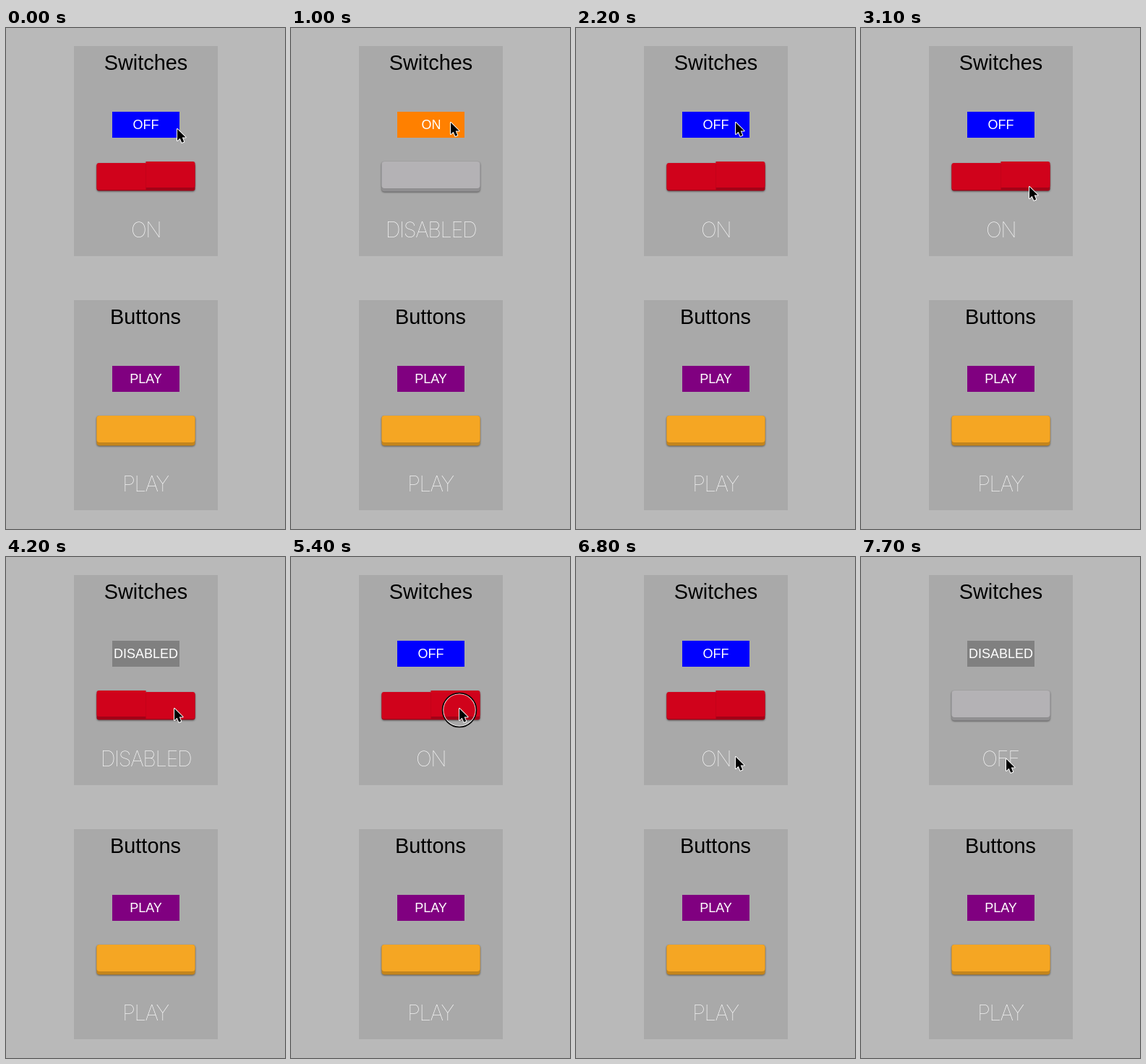
Write an HTML page that moves like this. It is 386 by 694 pixels and loops after 8 s.

```html
<!DOCTYPE html>
<html lang="en">
<head>
<meta charset="utf-8">
<title>Switches and buttons</title>
<style>
  html, body { margin: 0; height: 100%; overflow: hidden; background: #b9b9b9; }
  svg { display: block; width: 100vw; height: 100vh; }
  text { text-anchor: middle; font-family: "Liberation Sans", Arial, sans-serif; }
  .title { font-size: 28.9px; }
  .label { font-size: 18px; fill: #fff; }
  .thin { font: 100 29px Inter, Lato, sans-serif; letter-spacing: -1.4px; fill: #fff; }
  .panel { fill: #a9a9a9; }
  .raised { filter: drop-shadow(0 1px 1px rgba(0, 0, 0, .5)); }

  .idle, .first, .second, .third, #ring, #pointer { animation: 8s step-end infinite; }
  .idle { animation-name: idle; }
  .first { animation-name: first; }
  .second { animation-name: second; }
  .third { animation-name: third; }
  #ring { animation-name: press; }
  #pointer { animation-name: move; }

  /* 1.25% is 100 ms */
  @keyframes idle {
    0%, 26.25%, 58.75%, 78.75% { visibility: visible; }
    12.5%, 46.25%, 68.75%, 92.5%, 100% { visibility: hidden; }
  }
  @keyframes first {
    0%, 26.25%, 100% { visibility: hidden; }
    12.5% { visibility: visible; }
  }
  @keyframes second {
    0%, 58.75%, 78.75%, 100% { visibility: hidden; }
    46.25%, 68.75% { visibility: visible; }
  }
  @keyframes third {
    0% { visibility: hidden; }
    92.5%, 100% { visibility: visible; }
  }
  @keyframes press {
    0%, 12.5%, 26.25%, 46.25%, 58.75%, 68.75%, 78.75%, 92.5%, 100% { visibility: hidden; }
    10%, 25%, 45%, 57.5%, 67.5%, 77.5%, 91.25% { visibility: visible; }
  }
  @keyframes move {
    0% { transform: translate(237px, 140px); }
    1.25% { transform: translate(232px, 137px); }
    2.5% { transform: translate(226px, 133px); }
    3.75% { transform: translate(221px, 131px); }
    35% { transform: translate(227px, 185px); }
    36.25% { transform: translate(231px, 227px); }
    38.75% { transform: translate(233px, 220px); }
    40% { transform: translate(234px, 216px); }
    41.25% { transform: translate(233px, 212px); }
    42.5% { transform: translate(233px, 210px); }
    80% { transform: translate(232px, 222px); }
    81.25% { transform: translate(229px, 240px); }
    82.5% { transform: translate(226px, 258px); }
    83.75% { transform: translate(223px, 270px); }
    85% { transform: translate(221px, 277px); }
    86.25% { transform: translate(216px, 278px); }
    87.5% { transform: translate(212px, 279px); }
    88.75%, 100% { transform: translate(201px, 280px); }
  }
</style>
</head>
<body>
<svg viewBox="0 0 386 694">
  <defs>
    <rect id="flat" x="147" y="116" width="93" height="36"/>
    <g id="key" class="raised">
      <rect x="125.5" y="185" width="136" height="41.5" rx="4"/>
      <rect x="125.5" y="185" width="136" height="41.5" rx="4" fill="#000" opacity=".2"/>
      <rect x="125.5" y="185" width="136" height="37" rx="4"/>
    </g>
    <g id="rocker" class="raised" fill="#d0021b">
      <rect x="125.5" y="188" width="136" height="37.5" rx="3" fill="#a30217"/>
      <path d="M193.5 187H128.5a3 3 0 0 0-3 3V221a3 3 0 0 0 3 3H193.5z"/>
      <path d="M193.5 185H258.5a3 3 0 0 1 3 3V218a3 3 0 0 1-3 3H193.5z"/>
    </g>
    <g id="flatOff">
      <use href="#flat" fill="#808080"/>
      <text class="label" x="193.5" y="140.3">DISABLED</text>
    </g>
    <use id="keyOff" href="#key" fill="#b4b2b5"/>
    <text id="thinOff" class="thin" x="193.5" y="290">DISABLED</text>
  </defs>

  <rect width="386" height="694" fill="#b9b9b9"/>

  <rect class="panel" x="94" y="25" width="199" height="291"/>
  <text class="title" x="193.5" y="58">Switches</text>

  <g class="idle">
    <use href="#flat" fill="#00f"/>
    <text class="label" x="193.5" y="140.3">OFF</text>
    <use href="#rocker"/>
    <text class="thin" x="193.5" y="290">ON</text>
  </g>
  <g class="first">
    <use href="#flat" fill="#ff8000"/>
    <text class="label" x="194" y="140.3">ON</text>
    <use href="#keyOff"/>
    <use href="#thinOff"/>
  </g>
  <g class="second">
    <use href="#flatOff"/>
    <use href="#rocker" transform="translate(387 0) scale(-1 1)"/>
    <use href="#thinOff"/>
  </g>
  <g class="third">
    <use href="#flatOff"/>
    <use href="#keyOff"/>
    <text class="thin" x="193" y="290">OFF</text>
  </g>

  <g transform="translate(0 352)">
    <rect class="panel" x="94" y="25" width="199" height="291"/>
    <text class="title" x="193" y="57.5">Buttons</text>
    <use href="#flat" fill="#800080"/>
    <text class="label" x="193.5" y="140.3">PLAY</text>
    <use href="#key" fill="#f5a623"/>
    <text class="thin" x="193" y="290">PLAY</text>
  </g>

  <g id="pointer">
    <g id="ring" fill="none">
      <circle cy="2" r="22.4" stroke="#fff" stroke-width="1.4" opacity=".8"/>
      <circle cy="2" r="23.5" stroke="#000" stroke-width="1.5"/>
    </g>
    <path d="M0 0V16L3.7 12.7 6.3 18.8 9.2 17.6 6.7 11.6H11.6z"
      stroke="#fff" stroke-width="2" stroke-linejoin="round" paint-order="stroke"/>
  </g>
</svg>
</body>
</html>
```
